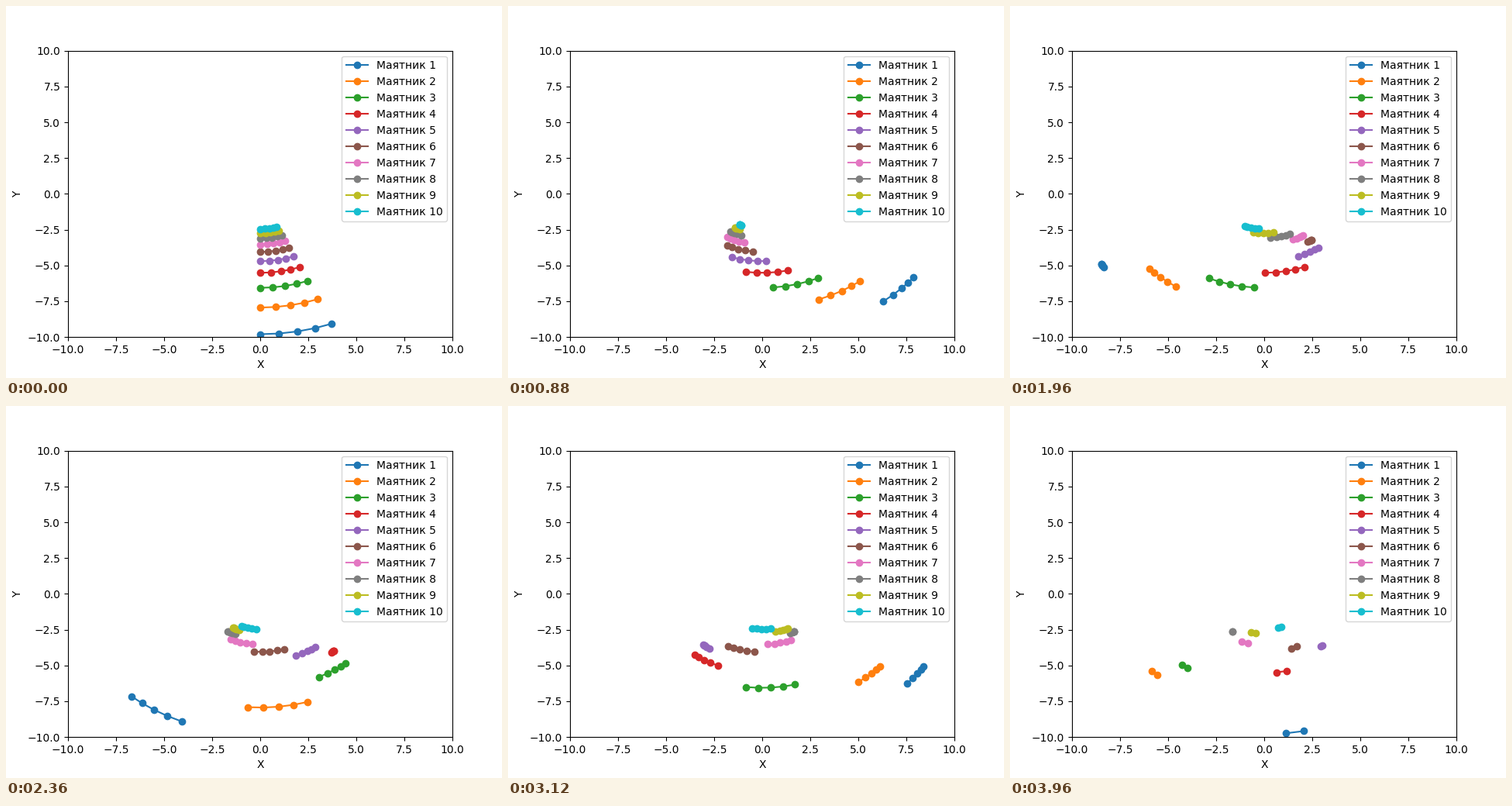
Recreate the animation shown at these times as a matplotlib script. Size 640 px wide and 480 px high, loop 4000 ms.

```python
import numpy as np
import matplotlib.pyplot as plt
from matplotlib.animation import FuncAnimation

G = 9.8
COUNT = 10
FRAMES = 100
DT = 0.1
TRAIL = 5
SUBSTEPS = 10

omega = np.linspace(1, 2, COUNT)
length = G / omega**2


def slope(state):
    angle, speed = state
    return np.array([speed, -omega**2 * np.sin(angle)])


def rk4(state, h):
    k1 = slope(state)
    k2 = slope(state + h / 2 * k1)
    k3 = slope(state + h / 2 * k2)
    k4 = slope(state + h * k3)
    return state + h / 6 * (k1 + 2 * k2 + 2 * k3 + k4)


def swing():
    """Angles of all pendulums, one row per time step."""
    state = np.array([np.zeros(COUNT), np.ones(COUNT)])
    angles = [state[0]]
    for _ in range(FRAMES):
        for _ in range(SUBSTEPS):
            state = rk4(state, DT / SUBSTEPS)
        angles.append(state[0])
    return np.array(angles)


theta = swing()
xs = length * np.sin(theta)
ys = -length * np.cos(theta)

fig, ax = plt.subplots(figsize=(6.4, 4.8), dpi=100)
ax.set_xlim(-10, 10)
ax.set_ylim(-10, 10)
ax.set_xlabel("X")
ax.set_ylabel("Y")
lines = [ax.plot([], [], "o-", label=f"Маятник {n + 1}")[0] for n in range(COUNT)]
ax.legend(loc="upper right")


def update(frame):
    part = slice(frame, frame + TRAIL)
    for n, line in enumerate(lines):
        line.set_data(xs[part, n], ys[part, n])
    return lines


anim = FuncAnimation(fig, update, frames=FRAMES, interval=40, repeat=True)
plt.show()
```
